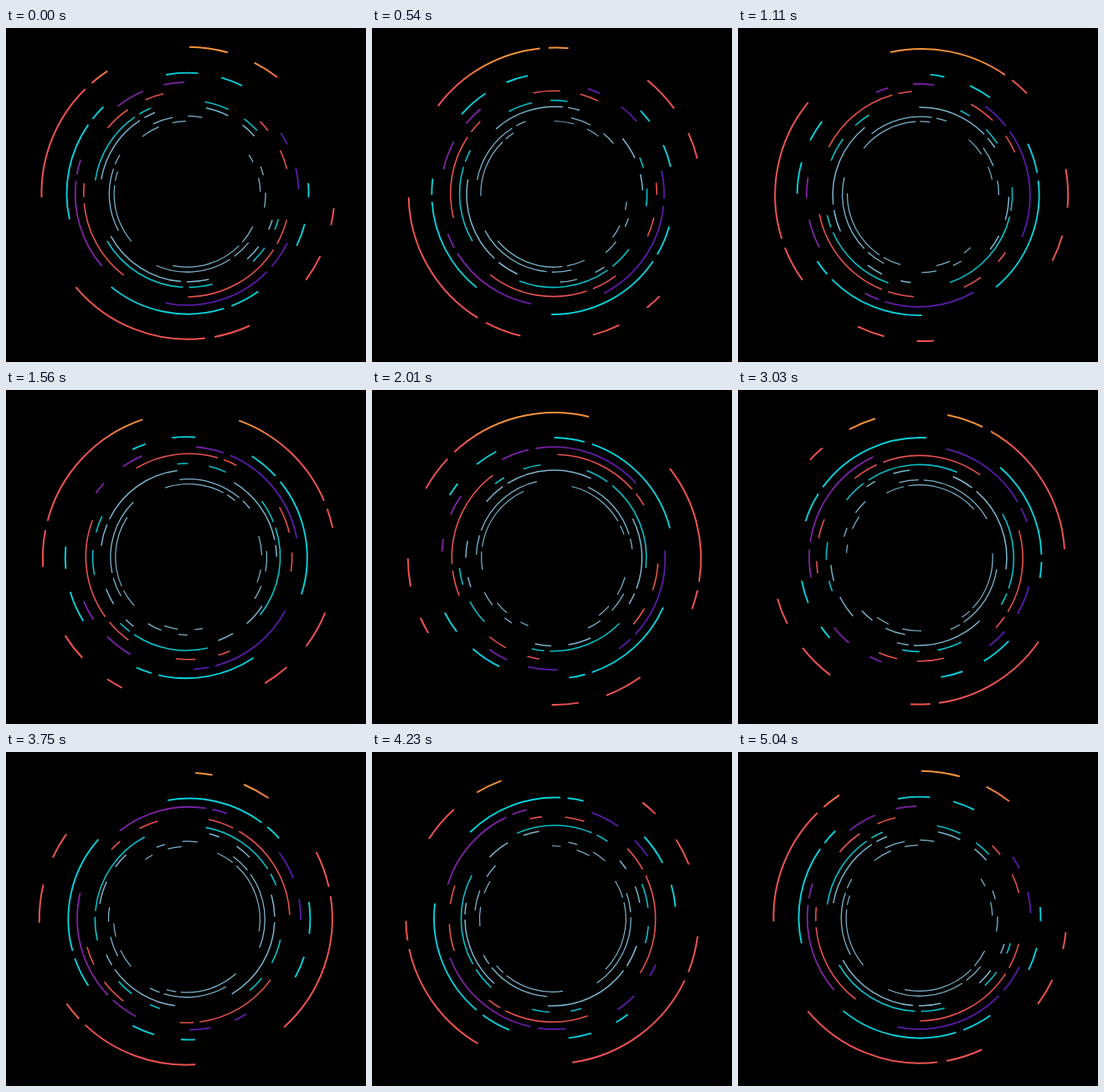
An HTML page with a canvas that plays this animation: 430 px wide and 400 px high, repeating every 5.07 s.

```html
<!DOCTYPE html>
<html lang="en">
<head>
<meta charset="utf-8">
<title>Orbit rings</title>
<style>
  html, body { margin: 0; width: 100%; height: 100%; overflow: hidden; background: #000; }
  canvas { display: block; }
</style>
</head>
<body>
<canvas id="stage" width="430" height="400"></canvas>
<script>
const ctx = document.getElementById('stage').getContext('2d');
const LOOP = 5070, TURN = 5040, STEP = 30;
const CX = 217, CY = 200;

// Every ring is a scaled copy of one shape whose centre is off the pivot.
const OFFSET = 0.0129, OFFSET_ANGLE = 11;

// Dashes shared by every ring: start and end in degrees, clockwise.
const DASHES = [
  [0, 15.2], [26.4, 37], [95.4, 102.1], [115, 126],
  [154.6, 169.1], [172.8, 229.5], [267.9, 315], [318.4, 326.1]
];

function gradient(x0, y0, x1, y1, from, to) {
  const g = ctx.createLinearGradient(x0, y0, x1, y1);
  g.addColorStop(0, from);
  g.addColorStop(1, to);
  return g;
}

const fire = gradient(0, 42, 0, 68, '#f6933a', '#ef5350');
const violet = gradient(165, 189, 240, 211, '#8023a5', '#5a1ba8');
const ice = '#7cb6cf';

// radius, line width, colour, direction, start angle
const RINGS = [
  [175, 2, fire, 1, 0.5],
  [144.5, 1.9, '#08d3dc', -1, -10.3],
  [133.5, 1.8, violet, -1, -38.4],
  [123.2, 1.6, '#e8524e', 1, -50.1],
  [112, 1.6, '#09bfc8', -1, 10.3],
  [105.2, 1.5, ice, 1, 11.8],
  [93.4, 1.3, ice, 1, -26],
  [87.4, 1.2, ice, 1, -38]
];

const rad = deg => deg * Math.PI / 180;

function drawRing([radius, width, color, dir, start], turn) {
  const angle = start + dir * turn;
  const lean = rad(angle + OFFSET_ANGLE);
  const x = CX + radius * OFFSET * Math.sin(lean);
  const y = CY - radius * OFFSET * Math.cos(lean);
  ctx.lineWidth = width;
  ctx.strokeStyle = color;
  for (const [from, to] of DASHES) {
    ctx.beginPath();
    ctx.arc(x, y, radius, rad(angle + from - 90), rad(angle + to - 90));
    ctx.stroke();
  }
}

function draw(ms) {
  const t = Math.floor((ms % LOOP + 0.5) / STEP) * STEP;
  const turn = (t % TURN) / TURN * 360;
  ctx.fillStyle = '#000';
  ctx.fillRect(0, 0, 430, 400);
  RINGS.forEach(ring => drawRing(ring, turn));
}

const begin = performance.now();
function frame() {
  draw(performance.now() - begin);
  requestAnimationFrame(frame);
}
frame();
</script>
</body>
</html>
```
